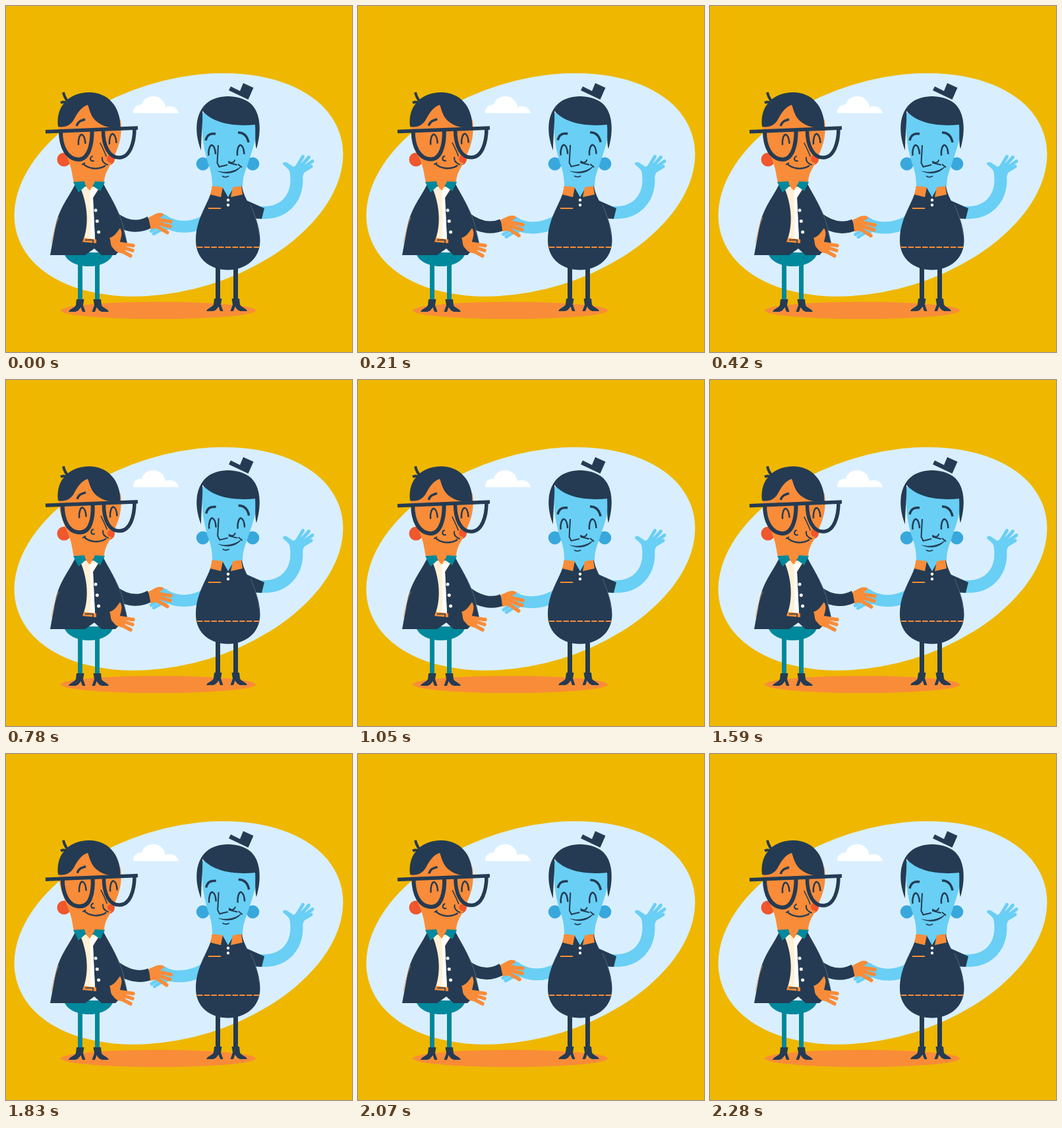
Write an HTML page with a canvas that moves like this. It is 525 px wide and 525 px high and loops after 2.31 s.

```html
<!DOCTYPE html>
<html lang="en">
<head>
<meta charset="utf-8">
<title>Handshake</title>
<style>
html, body { margin: 0; width: 100%; height: 100%; overflow: hidden; background: #efb700; }
canvas { display: block; width: 525px; height: 525px; }
</style>
</head>
<body>
<canvas id="stage"></canvas>
<script>
const SIZE = 525, LOOP = 2310, STEP = 30;
const SHAKE = LOOP / 3, NOD = LOOP / 2;
const YELLOW = '#efb700', SKY = '#d9efff', DARK = '#243b53', ORANGE = '#f98c39',
      RED = '#f0572d', BLUE = '#69cff5', DEEP = '#38a8dc', TEAL = '#00889c',
      CREAM = '#fff0d6', WHITE = '#fff';

const canvas = document.getElementById('stage');
const ctx = canvas.getContext('2d');
const ratio = window.devicePixelRatio || 1;
canvas.width = canvas.height = SIZE * ratio;

const fill = (d, color) => { ctx.fillStyle = color; ctx.fill(new Path2D(d)); };

function line(d, color, width, cap = 'butt') {
  ctx.strokeStyle = color;
  ctx.lineWidth = width;
  ctx.lineCap = cap;
  ctx.lineJoin = cap === 'round' ? 'round' : 'miter';
  ctx.stroke(new Path2D(d));
}

function oval(x, y, rx, ry, color, angle = 0) {
  ctx.fillStyle = color;
  ctx.beginPath();
  ctx.ellipse(x, y, rx, ry, angle, 0, Math.PI * 2);
  ctx.fill();
}

const dot = (x, y, r, color) => oval(x, y, r, r, color);

function shifted(x, y, draw, angle = 0) {
  ctx.save();
  ctx.translate(x, y);
  ctx.rotate(angle);
  draw();
  ctx.restore();
}

// Eased interpolation through [phase, value] pairs.
function keyed(keys, p) {
  const i = keys.findIndex(k => k[0] > p);
  const [p0, v0] = keys[i - 1], [p1, v1] = keys[i];
  const u = (p - p0) / (p1 - p0);
  return v0 + (v1 - v0) * u * u * (3 - 2 * u);
}

const shakeKeys = [[0, 1.4], [0.06, 2], [0.46, 8.5], [0.69, 0], [1, 1.4]];
const nodKeys = [[0, 0], [0.12, 0.25], [0.36, 0], [0.62, 1], [0.95, 0], [1, 0]];

function scenery() {
  ctx.fillStyle = YELLOW;
  ctx.fillRect(0, 0, SIZE, SIZE);
  oval(262, 271.3, 256.5, 158.5, SKY, -0.301);
  fill('M193 162.5 C193 154 199 149 206 150 C208 141 215 137 223 137 C233 137 240 143 242 153 C251 150 260 153 262 162.5 Z', WHITE);
  oval(231, 462, 148, 13, ORANGE);
}

function boot(x, y, dir) {
  shifted(x, y, () => {
    ctx.scale(dir, 1);
    fill('M-5 0 L6.5 0 L5 9 L8.5 19 L4 19 L1.5 12 C-2 17 -4 19 -8 19 L-17 19 C-15 14 -9 14 -6 9 Z', DARK);
  });
}

// A smiling closed eye.
const eye = (x, y) =>
  line(`M${x - 5} ${y + 15} C${x - 6} ${y + 6} ${x - 3} ${y - 1} ${x} ${y - 1} C${x + 3} ${y} ${x + 5} ${y + 5} ${x + 5.5} ${y + 13}`, DARK, 2.5);

function clasp(h) {
  // The two forearms follow the joined hands.
  line(`M304 325 C286 336 262 ${339 + h * 0.4} 240 ${325 + h}`, BLUE, 18);
  shifted(235, 328 + h, () => {
    fill('M10 -11 C4 -15 -3 -15 -8 -10 L-16 -3 L-16 1 L-6 4 L6 13 L19 4 Z', BLUE);
    line('M-2 5 L-15 12 M2 9 L-11 16', BLUE, 5, 'round');
  }, -h * 0.01);
  line(`M162 320 C180 334 199 ${338 + h * 0.5} 219 ${326 + h}`, DARK, 18);
  shifted(235, 328 + h, () => {
    fill('M-19 -8 L-8 -14 C-4 -16 2 -16 4 -14 C4 -10 0 -10 -3 -7 L-1 -3 L-4 8 L-10 8 L-15 10 Z', ORANGE);
    line('M-4 -5 L15 -2.5 M-5 0 L14 5 M-8 4 L10 14', ORANGE, 5.5, 'round');
  }, h * 0.012);
}

function leftBody() {
  fill('M88 374 H163 C160 388 143 395 126 395 C108 395 91 388 88 374 Z', TEAL);
  fill('M109 386 H116 V448 H109 Z M135 386 H142 V448 H135 Z', TEAL);
  boot(112, 445, 1);
  boot(139, 445, -1);

  fill('M105 270 C96 290 80 306 74.5 337 L67 378 H120 L134 368 L145 378 H166 L184 360 L176 330 C169 304 157 288 148 270 Z', DARK);
  line('M80 321 C75 332 72 345 69 360', ORANGE, 0.8);
  line('M168 308 C177 326 180 343 183 357', '#587083', 0.8);
  fill('M113 274 L143 274 L132 291 C133 312 134 335 135 354 L118 353 C125 333 125 305 113 276 Z', CREAM);
  fill('M140 276 L132 291 C133 312 134 335 135 354 L127 354 C129 334 129 306 127 280 Z', WHITE);
  fill('M118 352 L137 354 L137 360 L116 358 Z', ORANGE);
  line('M120 355 H132 V360', DARK, 1.5);
}

function leftHand() {
  fill('M173 337 C178 344 174 352 173 358 L182 361 L180 375 C174 376 167 374 163 368 C157 363 160 357 157 352 C164 350 168 344 173 337 Z', ORANGE);
  line('M175 361 L193 363.5 M176 366 L192 371 M174 371 L189 379', ORANGE, 5.5, 'round');
}

function leftHead(n) {
  dot(155, 232 + n, 10, RED);
  dot(88, 233, 10.5, RED);
  fill('M80 176 C79 202 89 219 96 238 C101 252 101 261 103 268 L118 270 L127 280 L135 268 L149 268 C149 252 158 245 163 231 C170 215 177 200 174 174 C162 140 92 138 80 176 Z', ORANGE);
  dot(159, 232 + n, 6 - n, RED);
  fill('M79 183 C75 150 98 131 126 131 C155 131 174 153 173.5 184 C156 187 137 180 130 166 C127 160 126 155 124 150 C114 153 108 163 102 174 C97 181 90 185 79 183 Z', DARK);
  line('M103 148 C93 148 89 139 87 131 M96 149 C91 145 87 145 83 147', DARK, 4);

  fill('M102 267 L119 266 L121 273 L110 283 Z M132 273 L135 266 L150 267 L143 281 Z', TEAL);
  for (let i = 0; i < 3; i++) dot(136 + i * 2.3, 310 + i * 16.5, 2.5, WHITE);

  shifted(n * 1.2, -n * 1.5, () => {
    line('M107 182 C110 174 114 174 120 172', DARK, 3.5);
    eye(115, 196);
    eye(162, 195);
    line('M143 208 C147 216 150 222 152 228', DARK, 1.6, 'round');
    line('M131 228 C126 231 128 236 133 235 M146 230 C145 236 149 239 154 241', DARK, 2, 'round');
    line('M117 239 C125 248 141 249 151 242', DARK, 2.4);
    line('M115 241 L120 238', DARK, 1.8);
  });

  const lx = n * 3, bar = 190 - n * 0.5;
  line(`M60 ${bar + 0.7} L200 ${185 - n * 0.4}`, DARK, 5.5);
  line(`M${83 + lx} ${bar} C${83 + lx} 213 ${92 + lx} 232 ${110 + lx} ${233 - n * 2} C${125 + lx} ${233 - n * 2} ${131 + lx * 0.6} 211 ${130.5 + lx * 0.4} ${bar - 2}`, DARK, 6);
  line(`M${147.5 + n} 187 C${147 + n} 213 157 ${231 - n} 173 ${230 - n} C188 ${229 - n} 195 208 195 185`, DARK, 5.5);
}

function waveArm() {
  line('M380 313 C424 318 446 290 440 250', BLUE, 19);
  fill('M431 258 C432 248 426 246 421 241 C418 237 424 236 427 238 L436 244 L448 238 L456 246 L449 260 Z', BLUE);
  line('M440 246 L450.5 228.5 M444 247 L459.5 229.5 M446 249 L465 235.5 M447 253 L463 243.5', BLUE, 5, 'round');
}

function rightBody() {
  fill('M365 295 L392 307 L388 323 L374 322 Z', DARK);
  fill('M318 390 H325 V448 H318 Z M345 390 H352 V448 H345 Z', DARK);
  boot(321, 444, 1);
  boot(349, 444, -1);
  fill('M313 273 H358 C361 297 385.5 318 385.5 356 C385.5 384 363 400.5 337 400.5 C310 400.5 288 384 288 356 C288 318 311 297 313 273 Z', DARK);
  line('M371 302 C378 318 383 331 384 347', '#587083', 0.8);
  ctx.setLineDash([8.5, 2.2]);
  line('M290 366 H385', ORANGE, 2);
  ctx.setLineDash([]);
  line('M307 307 H326', ORANGE, 2);
}

function rightHead(n) {
  dot(298.7, 239.5, 10, DEEP);
  dot(374.3, 239.5, 10, DEEP);
  fill('M298 162 C296 190 299 214 306 237 C312 252 313 263 313 274 L329 276 L337 290 L345 276 L359 274 C359 258 364 249 368 236 C376 213 381 196 383 174 Z', BLUE);
  fill('M296 219 C284 188 289 161 304 148 C321 133 353 134 370 147 C387 161 388 190 380 217 C377 207 379 193 378 180 C348 183 315 179 298 159 C299 176 296 197 296 219 Z', DARK);
  fill('M341 122 L355 129 L360 117 L375.5 124 L367.5 142 L338 128 Z', DARK);
  fill('M313 273 L329 275 L326 290 L310 286 Z M344 275 L357 273 L359 286 L341 290 Z', ORANGE);
  fill('M330 275 H344 L337 290 Z', BLUE);
  for (let i = 0; i < 2; i++) dot(337, 294.5 + i * 7.5, 2.2, WHITE);

  shifted(n * 0.7, -n * 1.5, () => {
    line('M303 204 C305 196 309 193 318 194 M352 192 C360 192 366 197 368 207', DARK, 3.5);
    eye(312.5, 212);
    eye(356, 212);
    line('M322 211 L320.5 238 L323.5 244 L336 241', DARK, 2);
    line('M338 236 C341 239 346 238 347 234 M338 238 L350 241', DARK, 2, 'round');
    fill('M320 250 C335 254 347 251 358 242 C350 255 333 257 320 250 Z', DARK);
    line('M352 240 L358 245 M328 258 C331 260 335 260 338 258', DARK, 1.8);
  });
}

function draw(time) {
  const t = Math.floor((time % LOOP) / STEP) * STEP;
  const shake = keyed(shakeKeys, (t % SHAKE) / SHAKE);
  const nod = keyed(nodKeys, (t % NOD) / NOD);

  ctx.setTransform(ratio, 0, 0, ratio, 0, 0);
  scenery();
  clasp(shake);
  waveArm();
  leftBody();
  leftHand();
  leftHead(nod);
  rightBody();
  rightHead(nod);
}

const start = performance.now();
function tick() {
  draw(performance.now() - start);
  requestAnimationFrame(tick);
}
tick();
</script>
</body>
</html>
```
